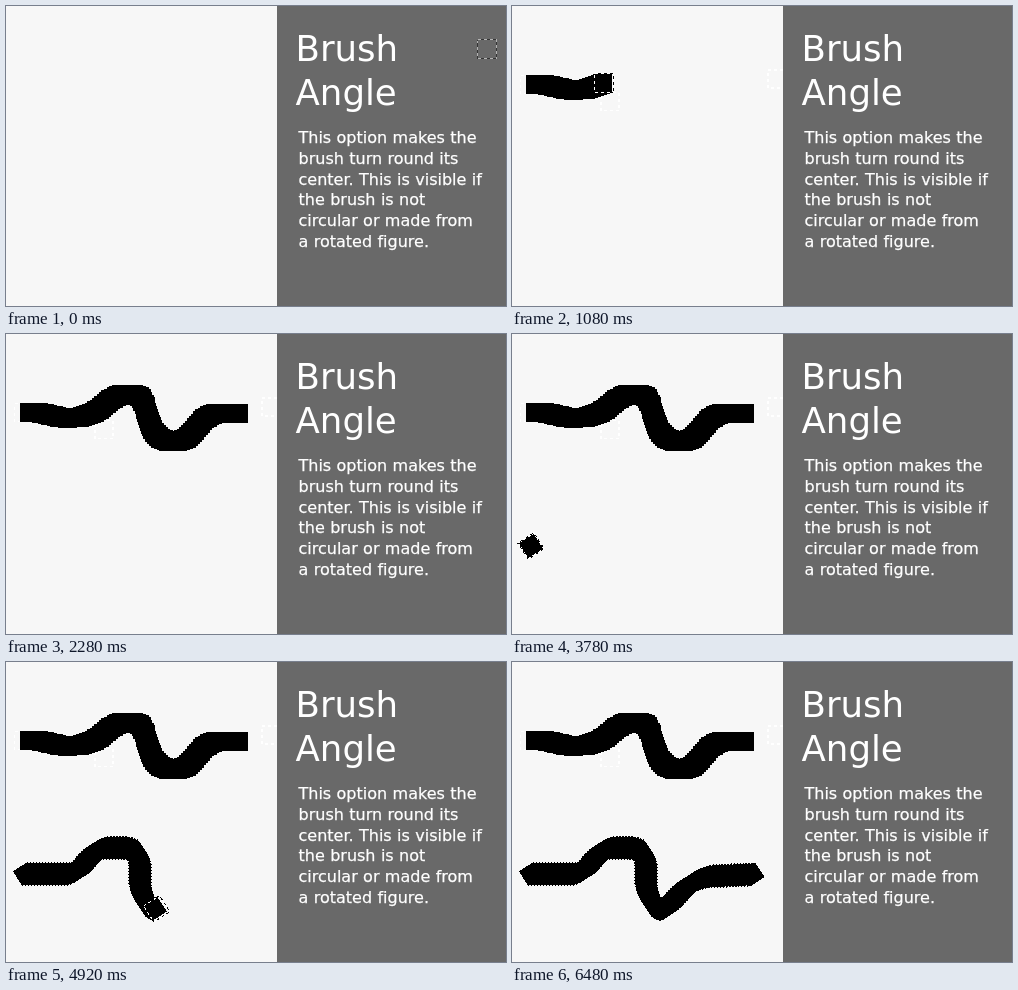
Animation of 500 by 300 pixels, one loop 6600 ms. Source, as an HTML page:

```html
<!DOCTYPE html>
<html lang="en">
<head>
<meta charset="utf-8">
<title>Brush Angle</title>
<style>
html, body { margin: 0; width: 100%; height: 100%; overflow: hidden; background: #f7f7f7; }
svg { display: block; width: 500px; height: 300px; }
text { font-family: "DejaVu Sans", Verdana, sans-serif; font-variant-ligatures: none; fill: #fff; }
.title { font-size: 35.6px; }
.body { font-size: 16px; word-spacing: .3px; stroke: #fff; stroke-width: .25px; }
.pixel { shape-rendering: crispEdges; }
.dash { fill: none; stroke-dasharray: 3 3; }
</style>
</head>
<body>
<svg viewBox="0 0 500 300">
  <rect width="500" height="300" fill="#f7f7f7"/>
  <g id="trails" class="pixel dash" stroke="#fff" stroke-width="1.5"></g>
  <rect x="271" width="229" height="300" fill="#696969"/>
  <g class="title">
    <text x="289.5" y="55">Brush</text>
    <text x="289.5" y="99">Angle</text>
  </g>
  <g id="copy" class="body"></g>
  <g id="strokes" class="pixel"></g>
  <g id="cursor" class="pixel dash">
    <rect x="-9.5" y="-9.5" width="19" height="19" stroke="#fff"/>
    <rect x="-9.5" y="-9.5" width="19" height="19" stroke="#000" stroke-dashoffset="3"/>
  </g>
</svg>
<script>
const LOOP = 6600, STEP = 60, SPACING = 3, TILT = -33;
const $ = id => document.getElementById(id);
const clamp = v => Math.max(0, Math.min(1, v));
const easeOut = v => 1 - (1 - v) ** 2;

function add(parent, tag, attrs, text = "") {
  const el = document.createElementNS("http://www.w3.org/2000/svg", tag);
  for (const k in attrs) el.setAttribute(k, attrs[k]);
  el.textContent = text;
  return parent.appendChild(el);
}

// Returns a function from 0..1 to a point along the curve, with its length
function makeCurve(d) {
  const path = add($("strokes"), "path", { d, fill: "none" });
  const length = path.getTotalLength();
  return { length, at: f => path.getPointAtLength(f * length) };
}

// Linear interpolation through [time, value] keys
function track(keys, t) {
  const i = keys.findIndex(k => t < k[0]);
  if (i < 0) return keys[keys.length - 1][1];
  if (i === 0) return keys[0][1];
  const [[t0, a], [t1, b]] = [keys[i - 1], keys[i]];
  return a + (b - a) * (t - t0) / (t1 - t0);
}

function stamp({ x, y }, side, angle) {
  const r = side / Math.SQRT2;
  const corners = [45, 135, 225, 315].map(c => {
    const a = (c + angle) * Math.PI / 180;
    return `${(x + r * Math.cos(a)).toFixed(2)} ${(y + r * Math.sin(a)).toFixed(2)}`;
  });
  return `M${corners.join("L")}Z`;
}

// A row of square stamps laid along a curve up to the brush position
function makeStroke(d, side, angle, keys) {
  const curve = makeCurve(d);
  const el = add($("strokes"), "path", {});
  const stamps = [];
  for (let s = 0; s <= curve.length; s += SPACING) {
    stamps.push(stamp(curve.at(s / curve.length), side, angle));
  }
  return t => {
    const f = track(keys, t), head = curve.at(f);
    const laid = stamps.slice(0, Math.floor(f * curve.length / SPACING) + 1);
    el.setAttribute("d", t < keys[0][0] ? "" : laid.join("") + stamp(head, side, angle));
    return head;
  };
}

["This option makes the", "brush turn round its", "center. This is visible if",
 "the brush is not", "circular or made from", "a rotated figure."]
  .forEach((line, i) => add($("copy"), "text", { x: 292.5, y: Math.round(137 + i * 20.8) }, line));

const flat = makeStroke(
  `M23.5 78.5 C40 78 48 84 62 84 C100 84 98 60.5 121 60.5 H127
   C147 60.5 134 108 168 108 C190 108 192 79 214 79 H232.5`,
  19, 0, [[600, 0], [1080, .27], [1980, .96], [2220, 1]]);

const tilted = makeStroke(
  `M19 212 H60 C80 212 81 186 102 186 H116 C128 186 134 190 134 206 V220
   C134 228 140 247 150 247 C160 247 172 214 205 214 L240.5 212.5`,
  17.5, TILT, [[3720, 0], [3840, 0], [5280, .855], [5340, .91], [5640, 1]]);

const stops = [[481, 43], [265, 73], [98, 95.5], [17.5, 78.5]];
const approachFlat = makeCurve("M" + stops.join("L"));
const approachTilted = makeCurve("M2 156 Q58 190 19 212");

// Faint outlines the cursor leaves behind at its stops
const trails = stops.slice(1).map(([x, y]) =>
  add($("trails"), "rect", { x: x - 9, y: y - 9, width: 18, height: 18 }));

function cursorAt(t, a, b) {
  if (t < 600) return approachFlat.at(easeOut(clamp(t / 420)));
  if (t < 2280) return { x: a.x + 2, y: a.y };
  if (t < 3180 || t >= 6480) return null;
  if (t < 3840) return approachTilted.at(clamp((t - 3180) / 540));
  return { x: b.x + 2, y: b.y };
}

function draw(ms) {
  const t = Math.floor(ms % LOOP / STEP) * STEP;
  const pos = cursorAt(t, flat(t), tilted(t));
  const cursor = $("cursor");
  cursor.style.display = pos ? "" : "none";
  if (pos) {
    cursor.setAttribute("transform", `translate(${pos.x} ${pos.y}) rotate(${t < 3000 ? 0 : TILT})`);
    cursor.setAttribute("opacity", pos.x > 271 ? .5 : 1);
  }
  trails.forEach((el, i) => { el.style.display = t >= 180 + i * 120 ? "" : "none"; });
}

const start = performance.now();
function tick() {
  draw(performance.now() - start);
  requestAnimationFrame(tick);
}
tick();
</script>
</body>
</html>
```
